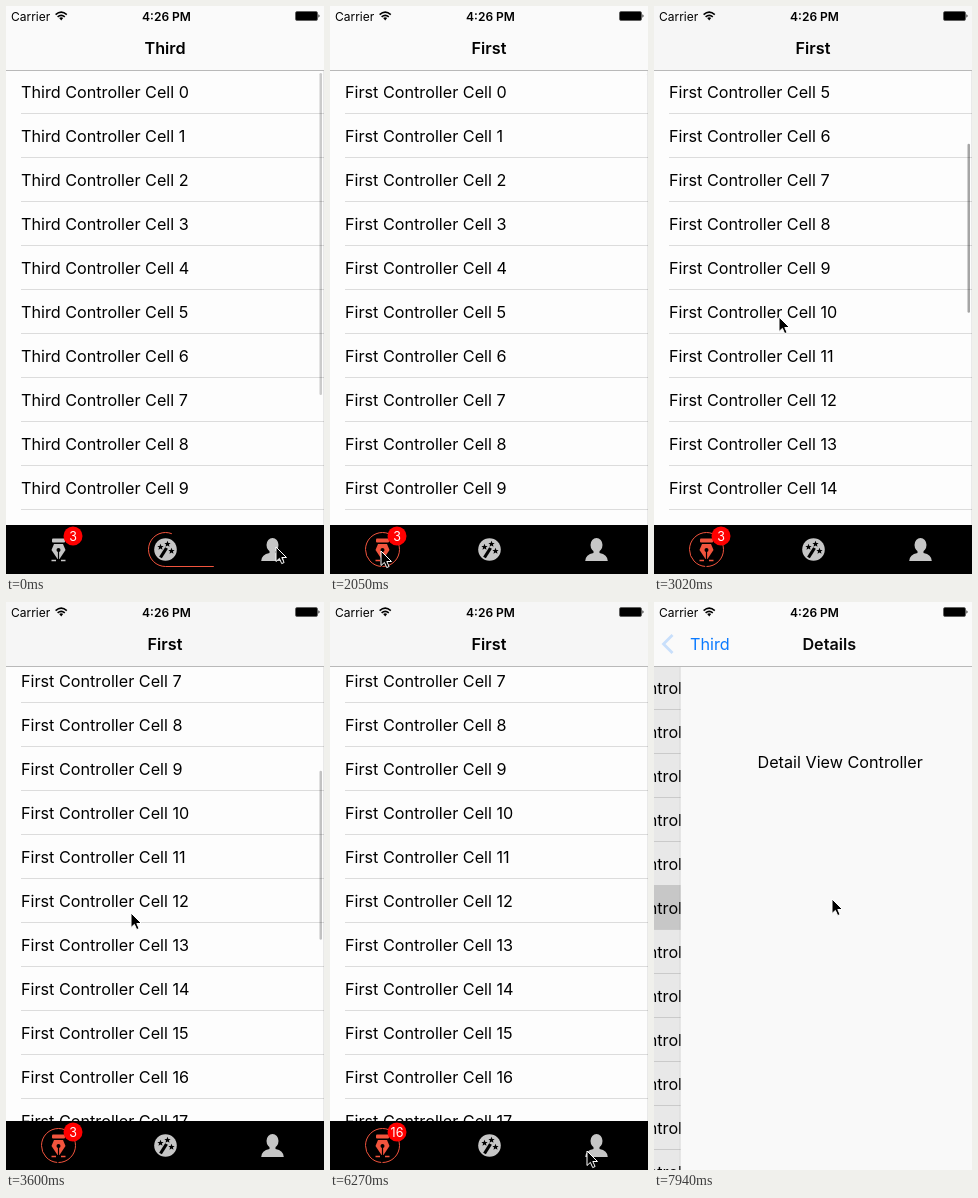
Animation, 318 px wide and 568 px high, one loop 8 s. Source, as an HTML page:

```html
<!DOCTYPE html>
<html lang="en">
<head>
<meta charset="utf-8">
<title>Tab bar</title>
<style>
  html, body { margin: 0; width: 100%; height: 100%; overflow: hidden; background: #fdfdfd; }
  svg { display: block; width: 318px; height: 568px; font: 16.2px Inter, "Liberation Sans", sans-serif; }
  .bold { font-weight: 600; }
  .mid { text-anchor: middle; }
  .status { font-size: 12px; }
</style>
</head>
<body>
<svg viewBox="0 0 318 568">
  <defs>
    <path id="star" d="M0-3.2L.9-1 3.1-1 1.4.5 2 2.7 0 1.4-2 2.7-1.4.5-3.1-1-.9-1Z"/>
  </defs>
  <rect width="318" height="568" fill="#fdfdfd"/>
  <g id="list">
    <g id="rows"></g>
    <rect id="bar" x="313.5" width="2.5" rx="1.25"/>
  </g>
  <rect id="dim" y="64" width="318" height="504"/>
  <g id="detail">
    <rect x="-1" y="64" width="1" height="504" opacity=".08"/>
    <rect y="64" width="318" height="504" fill="#f9f9f9"/>
    <text class="mid" x="159.5" y="166">Detail View Controller</text>
  </g>

  <rect id="nav" width="318" height="64"/>
  <path d="M0 64.5H318" stroke="#b9b9b9"/>
  <text class="status" x="5" y="14.5">Carrier</text>
  <g fill="none" stroke="#000" stroke-width="1.6">
    <path d="M49.6 8.6Q55.2 3.8 60.8 8.6M51.6 10.9Q55.2 7.8 58.8 10.9"/>
    <path d="M53.2 12L55.2 14.4 57.2 12Q55.2 10.6 53.2 12Z" fill="#000" stroke="none"/>
  </g>
  <text class="status bold mid" x="160.5" y="14.5">4:26 PM</text>
  <rect x="289.5" y="5.5" width="22" height="9" rx="1.5" stroke="#555" stroke-width=".7"/>
  <path d="M312.5 8.3Q314.5 10 312.5 11.7Z"/>
  <path id="chevron" d="M18.5 33L9.5 42 18.5 51" fill="none" stroke="#0a7aff" stroke-width="2.8"/>
  <text id="title" class="bold mid" y="48"></text>
  <text id="back" class="mid" y="48" fill="#0a7aff">Third</text>
  <text id="next" class="bold mid" y="48">Details</text>

  <g id="tabs">
    <rect y="519" width="318" height="49"/>
    <g class="icon" transform="translate(52.5 543.5)">
      <rect x="-6.5" y="-11" width="13" height="4" rx="1"/>
      <path d="M-4.5-5.5H4.5L7 .5 1 9.5H-1L-7 .5Z"/>
      <path d="M-7 11H-2.5M2.5 11H7" stroke="currentColor" stroke-width="1.3"/>
      <path d="M0 1V10" stroke="#000" stroke-width="1.2"/>
      <circle cy=".5" r="2" fill="#000"/>
    </g>
    <g class="icon" transform="translate(159.5 543.5)">
      <circle r="11.3"/>
      <path d="M-5 8L1-1.5" stroke="#000" stroke-width="3.2"/>
      <g fill="#000">
        <use href="#star" x="2" y="-5.5"/>
        <use href="#star" x="-5" y="-2.5"/>
        <use href="#star" x="6" y="1.5"/>
      </g>
    </g>
    <g class="icon" transform="translate(266.5 543.5)">
      <ellipse cy="-4.5" rx="6" ry="7"/>
      <path d="M-3 0H3V3.5Q11 5 11.3 11.5H-11.3Q-11 5-3 3.5Z"/>
    </g>
    <path id="trail" fill="none" stroke="#f2543d"/>
    <circle cx="67" cy="530" r="9.5" fill="#f00"/>
    <text id="badge" class="mid" x="67" y="534.5" fill="#fff" font-size="12.5"></text>
  </g>
  <path id="cursor" d="M0 0V14.5L3.4 11.4 5.7 16.6 8.1 15.5 5.8 10.5H10.5Z" stroke="#fff" stroke-width="1"/>
</svg>
<script>
const LOOP = 8000, ROW = 44, TOP = 64, RED = '#f2543d', GREY = '#c6c6c6';
const RADIUS = 17, RING = 2 * Math.PI * RADIUS, GAP = 107, TRAVEL = 2 * (RING + GAP);
const SWITCH_TIME = 860, PUSH_AT = 7720;
const $ = id => document.getElementById(id);
const set = (el, attrs) => { for (const k in attrs) el.setAttribute(k, attrs[k]); };
const clamp = v => Math.min(1, Math.max(0, v));
const smooth = u => u * u * (3 - 2 * u);
const mix = (a, b, u) => a + (b - a) * u;

const switches = [
  { at: -491, to: 2, title: 'Third' },
  { at: 860, to: 0, title: 'First' },
  { at: 6500, to: 2, title: 'Third' }
];
// time, x, y
const cursorKeys = [
  [0, 270, 541], [60, 270, 541], [720, 76, 545], [900, 76, 545], [1550, 45, 545],
  [1990, 45, 545], [2050, 51, 545], [2160, 80, 546], [2330, 80, 546], [2620, 125, 311],
  [3600, 125, 311], [4350, 136, 530], [4410, 136, 530], [4950, 168, 443],
  [5110, 168, 443], [5490, 266, 549], [5960, 266, 549], [6090, 258, 550],
  [6270, 257, 549], [6600, 257, 549], [7360, 178, 297], [LOOP, 178, 297]
];
// time, opacity
const barKeys = [
  [0, .2], [60, .2], [420, 0], [860, 0], [870, .25], [1250, .25], [1600, 0],
  [2600, 0], [2660, .35], [3480, .35], [3840, 0], [6500, 0], [6520, .25], [LOOP, .25]
];

function track(keys, t, ease = u => u) {
  const i = Math.max(1, keys.findIndex(k => k[0] > t));
  const a = keys[i - 1], b = keys[i];
  const u = ease(clamp((t - a[0]) / (b[0] - a[0])));
  return a.slice(1).map((v, j) => mix(v, b[j + 1], u));
}

function trailPath(to) {
  const sweep = to ? 0 : 1, step = to ? GAP : -GAP;
  const loop = [-1, 1].map(s => `a17 17 0 0 ${sweep} 0 ${s * 2 * RADIUS}`).join('');
  return `M${to ? 52.5 : 266.5} 560.5${loop}h${step}${loop}h${step}${loop}`;
}

const rows = Array.from({ length: 13 }, () => {
  const g = document.createElementNS('http://www.w3.org/2000/svg', 'g');
  g.innerHTML = '<rect y="-1" width="318" height="45" fill="#d9d9d9"/>' +
    '<path d="M15 43.5H318" stroke="#dcdcdc"/><text x="15" y="27.5"></text>';
  $('rows').append(g);
  return g;
});
const icons = [...document.querySelectorAll('.icon')];

function drawList(t, title) {
  const first = title === 'First';
  const glide = 1 - (1 - clamp((t - 2652) / 728)) ** 1.7;
  const scroll = first ? Math.round(315 * glide) : 0;
  const start = Math.floor(scroll / ROW);
  rows.forEach((g, i) => {
    const n = start + i;
    const [fill, , label] = g.children;
    set(g, { transform: `translate(0 ${TOP + n * ROW - scroll})` });
    fill.style.display = !first && n === 5 && t >= 7560 ? '' : 'none';
    label.textContent = `${title} Controller Cell ${n}`;
  });
  set($('bar'), {
    y: first ? 66 + scroll * .326 : 67,
    height: first ? 169 : 322,
    opacity: track(barKeys, t)[0]
  });
  set($('nav'), { fill: scroll ? '#f6f6f6' : '#fafafa' });
}

function drawPush(t) {
  const w = Math.max(0, t - PUSH_AT) * .0186;
  const p = 1 - (1 + w) * Math.exp(-w);
  const labelX = mix(159, 46.5, p);
  set($('list'), { transform: `translate(${-95 * p} 0)` });
  set($('dim'), { opacity: .09 * p });
  set($('detail'), { transform: `translate(${318 * (1 - p)} 0)` });
  set($('title'), { x: labelX, opacity: clamp(1 - 2 * p) });
  set($('back'), { x: labelX, opacity: clamp(2 * p - .5) });
  set($('next'), { x: mix(353, 159, p), opacity: clamp(p * 1.6 - .5) });
  set($('chevron'), { opacity: clamp((p - .89) * 8) });
  $('tabs').style.display = t >= PUSH_AT ? 'none' : '';
}

function drawTabs(t, { at, to }) {
  const u = clamp((t - at) / SWITCH_TIME);
  set($('trail'), {
    d: trailPath(to),
    'stroke-dasharray': `${RING + 1} 2000`,
    'stroke-dashoffset': -TRAVEL * smooth(u)
  });
  icons.forEach((icon, i) => {
    const color = u === 1 && i === to ? RED : GREY;
    set(icon, { fill: color, color });
  });
  $('badge').textContent = t < 5130 ? 3 : 16;
}

function draw(t) {
  const current = switches.filter(s => s.at <= t).pop();
  $('title').textContent = current.title;
  drawList(t, current.title);
  drawPush(t);
  drawTabs(t, current);
  set($('cursor'), { transform: `translate(${track(cursorKeys, t, smooth)})` });
}

const began = performance.now();
function frame() {
  draw((performance.now() - began) % LOOP);
  requestAnimationFrame(frame);
}
frame();
</script>
</body>
</html>
```
